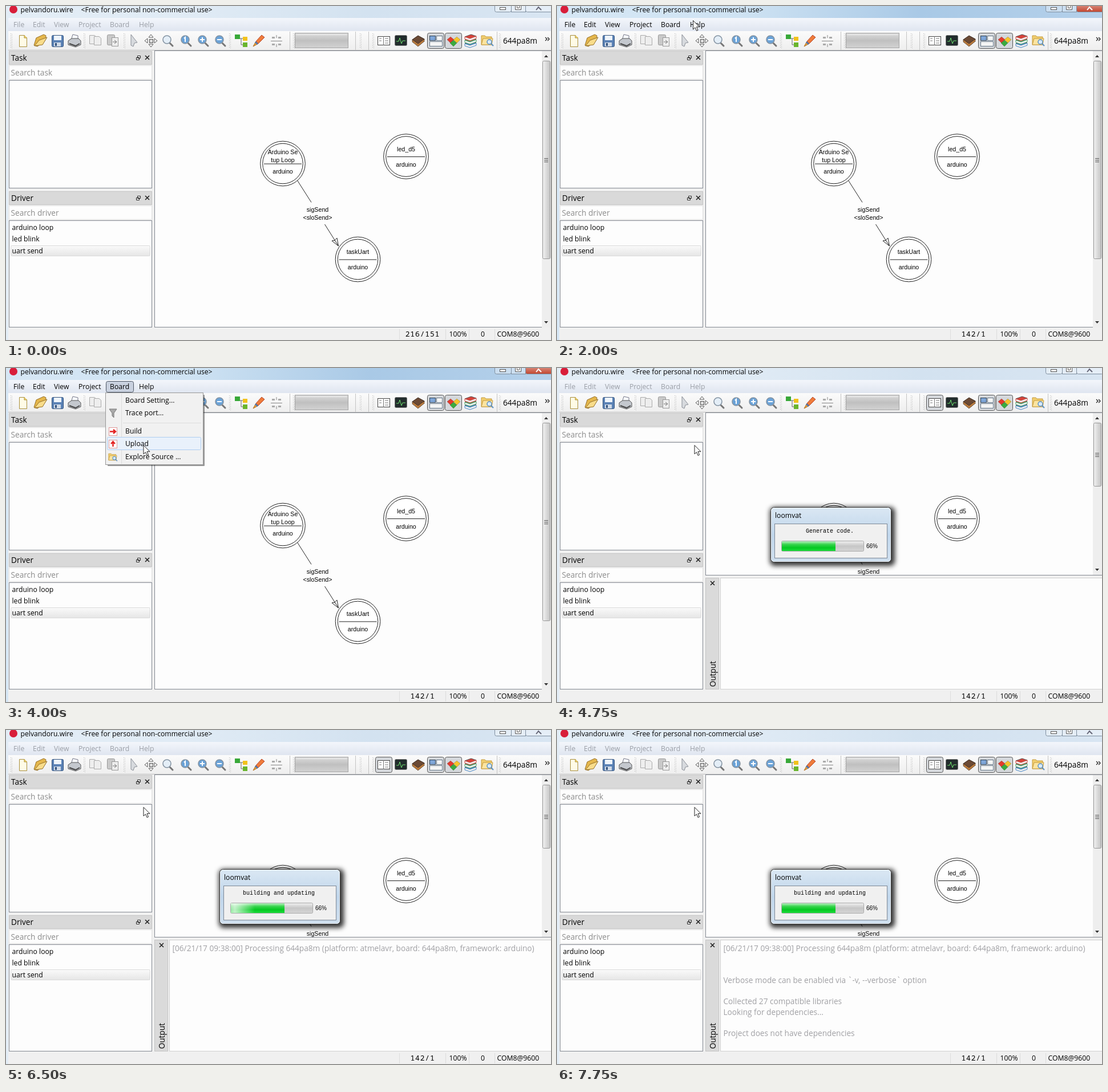
Write an HTML page that moves like this. It is 955x586 px and loops after 8000 ms.

```html
<!DOCTYPE html>
<html lang="en">
<head>
<meta charset="utf-8">
<title>Wire editor</title>
<style>
  html, body { margin: 0; width: 100%; height: 100%; overflow: hidden; background: #f0f0f0; }
  svg { display: block; width: 955px; height: 586px; font: 12.2px "Open Sans", "Noto Sans", sans-serif; }
  text { white-space: pre; }
  .big { font-size: 13.67px; }
  .dim { fill: #8c8c8c; }
  .node { font: 10.65px "Liberation Sans", Arial, sans-serif; text-anchor: middle; }
  .mono { font: 10px "Liberation Mono", monospace; text-anchor: middle; }
  .pos { font: 13px "Noto Sans Mono", monospace; letter-spacing: .85px; text-anchor: middle; }
</style>
</head>
<body>
<svg id="stage" viewBox="0 0 955 586"></svg>
<script>
const STEP = 250, LOOP = 8000;
const stage = document.getElementById('stage');

const rect = (x, y, w, h, fill, more = '') =>
  `<rect x="${x}" y="${y}" width="${w}" height="${h}" fill="${fill}" ${more}/>`;
const box = (x, y, w, h, fill, line, more = '') =>
  rect(x + .5, y + .5, w - 1, h - 1, fill, `stroke="${line}" ${more}`);
const text = (x, y, s, more = '') =>
  `<text x="${x}" y="${y}" ${more}>${s.replace(/</g, '&lt;')}</text>`;
const path = (d, fill = 'none', line = 'none', more = '') =>
  `<path d="${d}" fill="${fill}" stroke="${line}" ${more}/>`;
const disc = (x, y, r, fill, line = 'none', more = '') =>
  `<circle cx="${x}" cy="${y}" r="${r}" fill="${fill}" stroke="${line}" ${more}/>`;
const group = (id, body, more = '') => `<g id="${id}" ${more}>${body}</g>`;
const at = (x, y, body) => `<g transform="translate(${x} ${y})">${body}</g>`;
const grad = (id, down, ...colors) =>
  `<linearGradient id="${id}" x2="${down ? 0 : 1}" y2="${down ? 1 : 0}">` +
  colors.map((c, i) => `<stop offset="${i / (colors.length - 1)}" stop-color="${c}"/>`).join('') +
  '</linearGradient>';

const defs = `<defs>
  ${grad('idleGlass', 0, '#e3edf6', '#e0ebf5', '#d3e2f0', '#d8e5f2')}
  ${grad('liveGlass', 0, '#d6e7f5', '#cfe3f3', '#a9c9e6', '#b4d0ea')}
  ${grad('menuBar', 1, '#f3f6fb', '#dfe5f0')}
  ${grad('bar', 1, '#fbfbfb', '#eeeeee')}
  ${grad('btn', 1, '#dcdcdc', '#c0c0c0', '#d2d2d2')}
  ${grad('row', 1, '#fafafa', '#e6e6e6')}
  ${grad('thumb', 0, '#f3f3f3', '#dadada', '#c4c4c4')}
  ${grad('red', 1, '#e0a295', '#c2452f')}
  ${grad('aero', 1, '#dbe8f4', '#bfd5ea', '#cfdfee')}
  ${grad('track', 1, '#f0f0f0', '#c6c6c6', '#d6d6d6')}
  ${grad('green', 1, '#b5f0bd', '#35d34b', '#05c822', '#1bdc3a')}
  ${grad('shine', 0, '#fff0', '#fffb', '#fff0')}
  <filter id="blur" x="-20%" y="-30%" width="140%" height="160%"><feGaussianBlur stdDeviation="4.5"/></filter>
  <clipPath id="filled"><rect x="394" y="304" width="94" height="17"/></clipPath>
</defs>`;

const frame = (id, glass, close, glyph) =>
  group(id, rect(0, 0, 955, 586, glass) +
    box(856, -6, 30, 17, '#fff5', '#7f8f9f', 'rx="3"') + box(885, -6, 26, 17, '#fff5', '#7f8f9f') +
    box(910, -6, 48, 17, close, '#7f8f9f', 'rx="3"') +
    rect(865.5, 2.5, 10, 4, '#fff', 'stroke="#555"') +
    path('M892.5 -2V6.5H902.5V-2M895.5 0V3.5H899.5V0', '#fff', '#555') +
    path('M929 7L933 2L938 7M930 -1L937 -1', 'none', glyph, 'stroke-width="2"'));

const lens = (x, inner, fill) =>
  path(`M${x + 4} 65L${x + 9} 70`, 'none', '#777', 'stroke-width="3" stroke-linecap="round"') +
  disc(x - 1, 59, 7, fill, '#8594a3', 'stroke-width="1.6"') + inner;
const blueLens = (x, d) => lens(x, path(d, 'none', '#fff', 'stroke-width="2"'), '#6ba3d8');
const folder = path('M-10 -8H-4L-2 -6H8V8H-10Z', '#f1cf70', '#c59a3c') +
  path('M-10 8L-7 -3H10L8 8Z', '#fbe4a0', '#c59a3c');
const findFolder = (x, y, k) => at(x, y, `<g transform="scale(${k})">` + folder +
  disc(4, 3, 4, '#d7eafc', '#5a8fc0', 'stroke-width="1.5"') +
  path('M7 6L11 10', 'none', '#5a8fc0', 'stroke-width="2"') + '</g>');
const grip = x => path(`M${x + .5} 48V74M${x + 2.5} 49V75`, 'none', '#b5b5b5', 'stroke-dasharray="1 2"');
const rule = x => path(`M${x + .5} 45V77`, 'none', '#c3c3c3');
const pressed = x => box(x, 47, 30, 28, '#d5d8dc', '#555', 'rx="3"');
const rhomb = (x, y, c) => path(`M${x} ${y - 5}L${x + 6} ${y}L${x} ${y + 6}L${x - 6} ${y}Z`, c, '#0003');
const book = (y, c) => path(`M804 ${y}L815 ${y - 4}L824 ${y - 1}L813 ${y + 3}Z`, c, '#555') +
  path(`M804 ${y}V${y + 4}L813 ${y + 7}L824 ${y + 3}V${y - 1}L813 ${y + 3}Z`, '#eee', c);

const icons =
  path('M23.5 51.5H32L36.5 56V71.5H23.5Z', '#fffbe6', '#a98f3d') + path('M32 51V56H37', '#f2d56c', '#a98f3d') +
  path('M49 69L53 56L66 50L70 52L69 60L55 71Z', '#e5b74c', '#95702a') + path('M50 70L58 60L72 55L64 68Z', '#f8dc8a', '#95702a') +
  box(80, 51, 21, 21, '#5b82b5', '#33537e', 'rx="2"') + rect(84, 52, 13, 8, '#eef4fb') + rect(84, 64, 12, 7, '#cfd9e6') + rect(86, 65, 3, 5, '#33537e') +
  path('M114 60L117 50L126 52L126 61Z', '#f7fbff', '#778') + path('M109 61L115 57H127L131 61V68L122 72L109 68Z', '#c4c8ce', '#555') + path('M111 66L122 70L129 66', 'none', '#444', 'stroke-width="2"') +
  [146, 154].map(x => path(`M${x + .5} ${x / 4 + 15}H${x + 9}L${x + 12.5} ${x / 4 + 18}V${x / 4 + 30}H${x + .5}Z`, '#eee', '#aaa')).join('') +
  box(177, 50, 14, 19, '#c9c9c9', '#999', 'rx="2"') + box(185, 55, 12, 16, '#eee', '#999') + path('M187 63H193M190 60L194 63L190 66', 'none', '#777') +
  path('M219 50L230 64L225 65L223 71L219 69Z', '#d7dade', '#8b9098') +
  path('M254 50L258 55H250ZM254 72L258 67H250ZM243 61L248 57V65ZM265 61L260 57V65Z', '#fff', '#555') + box(251, 58, 7, 7, '#ddd', '#555') +
  lens(283, '', '#e4eef7') + blueLens(315, 'M312 57L314 55V63') + blueLens(345, 'M340 59H348M344 55V63') + blueLens(375, 'M370 59H378') +
  path('M407 57H418M412 57V68H417', 'none', '#666') + rect(401, 50, 9, 8, '#38a838') + rect(415, 54, 8, 7, '#f2c21c') + rect(415, 64, 8, 8, '#69b52d') +
  path('M433 71L438 62L442 66Z', '#e8a43a', '#b06a20') + path('M438 62L448 51L453 55L442 66Z', '#ef7c3b', '#b5452a') + path('M437 63L441 67', 'none', '#5577aa', 'stroke-width="3"') +
  path('M464 61.5H484M474 51V56M474 67V72', 'none', '#888') + [[466, 54], [477, 54], [466, 66], [477, 66]].map(([x, y]) => rect(x, y, 5, 3, '#aaa')).join('') +
  group('outBtn', pressed(647)) +
  box(651, 53, 22, 16, '#fff', '#444') + path('M661.5 53V69M664 57H670M664 61H670M664 65H670M654 57H658M654 61H658', 'none', '#777') +
  box(681, 51, 22, 19, '#222c2c', '#777', 'rx="2"') + path('M684 62H688L690 56L693 66L695 61H700', 'none', '#6fe06f') +
  path('M712 59L722 52L733 58L722 66Z', '#6b4a35', '#3b2a20') + path('M712 59V63L722 71L733 62V58L722 66Z', '#b97a3c', '#3b2a20', 'stroke-dasharray="2 1"') +
  pressed(738) + box(742, 52, 11, 9, '#7fa6d8', '#345') + box(754, 52, 11, 9, '#f4f4f4', '#678') + box(742, 62, 23, 9, '#f4f4f4', '#678') +
  pressed(769) + rhomb(779, 59, '#e23b2e') + rhomb(790, 59, '#f5c52c') + rhomb(784, 65, '#3aab3f') +
  book(66, '#4a88c8') + book(60, '#4aa568') + book(54, '#d8433a') + findFolder(843, 60, 1);

const dock = (y, name, hint, listH) =>
  box(5, y, 251, 24, '#d9d9d9', '#c4c4c4') + text(9, y + 17, name, 'class="big"') +
  path(`M230.5 ${y + 8.5}H235.5V${y + 12.5}H230.5ZM228.5 ${y + 11.5}H233.5V${y + 15.5}H228.5Z`, '#eee', '#222') +
  path(`M244 ${y + 8}L251 ${y + 15}M251 ${y + 8}L244 ${y + 15}`, 'none', '#222', 'stroke-width="1.6"') +
  box(5, y + 25, 251, 25, '#fdfdfd', '#e2e2e2') + text(8.5, y + 43, hint, 'class="big dim"') +
  box(5, y + 51, 251, listH, '#fdfdfd', '#828790');

const node = (x, y, lines, below) =>
  at(x, y, disc(0, 0, 39.3, '#fff', '#222') + disc(0, 0, 35.3, '#fff', '#222') +
    path('M-33 .5H33', 'none', '#222', 'stroke-width="1.2"') +
    lines.map((s, i) => text(0, -9.5 + 14 * (i + 1 - lines.length) + (lines.length - 1) * 6.5, s)).join('') + text(0, 17.5, below));

const scroll = (h, bottom) =>
  rect(939, 79, 16, bottom - 79, '#eeeeee') +
  path(`M943 90L946.5 86L950 90ZM943 ${bottom - 11}L946.5 ${bottom - 7}L950 ${bottom - 11}Z`, '#333') +
  box(940, 96, 14, h, 'url(#thumb)', '#979797', 'rx="2"') +
  [-3, 0, 3].map(d => rect(943, Math.round(96 + h / 2 + d), 7, 1, '#555')).join('');

const menuNames = [[13, 'File'], [47, 'Edit'], [84, 'View'], [127, 'Project'], [182, 'Board'], [233, 'Help']];
const rows = [[57, 'Board Setting...'], [79, 'Trace port...'], [111, 'Build'], [133, 'Upload'], [156, 'Explore Source ...']];
const redBox = (y, d) => box(180, y - 7, 15, 15, '#fff', '#d99') + path(d, 'none', '#e32222', 'stroke-width="2.4"');

const dropMenu =
  rect(178, 47, 170, 125, '#0006', 'rx="1"') + box(174, 43, 172, 127, '#f1f1f1', '#979797') +
  path('M202.5 45V168M205 96.5H342', 'none', '#dcdcdc') +
  box(177, 0, 165, 23, '#e9f1fb', '#aecdf0', 'id="hover" rx="2"') +
  path('M181 72H194L189 79V87L186 84V79Z', '#aaa', '#777') +
  redBox(111, 'M182 111.5H191M188 108L192 111.5L188 115') + redBox(133, 'M187.5 138V130M184 133L187.5 129L191 133') +
  findFolder(187, 156, .72) + rows.map(([y, s]) => text(209, y + 4, s)).join('');

// Baseline, first step and text of each output line.
const log = [[388, 26, '[06/21/17 09:38:00] Processing 644pa8m (platform: atmelavr, board: 644pa8m, framework: arduino)'],
  [444, 28, 'Verbose mode can be enabled via `-v, --verbose` option'],
  [481, 31, 'Collected 27 compatible libraries'], [500, 31, 'Looking for dependencies...'],
  [537, 31, 'Project does not have dependencies']];

const output =
  rect(260, 363, 695, 202, '#f0f0f0') + rect(260, 363, 695, 1, '#828790') + scroll(112, 363) +
  box(260, 368, 24, 196, '#dadada', '#c4c4c4') + box(286, 368, 680, 196, '#fdfdfd', '#d0d0d0') +
  path('M269 374L276 381M276 374L269 381', 'none', '#222', 'stroke-width="1.6"') +
  text(0, 0, 'Output', 'class="big" transform="translate(278 559.5) rotate(-90)"') +
  log.map(([y, , s], i) => text(291.5, y, s, `id="log${i}" class="big" fill="#a0a0a4"`)).join('') +
  rect(373, 244, 219, 103, '#000c', 'rx="8" filter="url(#blur)"') +
  box(374, 244, 212, 97, 'url(#aero)', '#333', 'rx="6"') + box(375, 245, 210, 95, 'none', '#fffb', 'rx="5"') +
  text(382, 263, 'loomvat') + box(381, 273, 198, 61, '#f0f0f0', '#7d8896') +
  text(478, 288.5, '', 'id="message" class="mono"') +
  box(393, 303, 145, 19, 'url(#track)', '#a9a9a9', 'rx="2"') + rect(394, 304, 94, 17, 'url(#green)') +
  `<g clip-path="url(#filled)">${rect(0, 304, 70, 17, 'url(#shine)', 'id="gleam"')}</g>` +
  text(542, 316, '66%', 'style="font:10px Liberation Sans,Arial,sans-serif"');

stage.innerHTML = defs + frame('idle', 'url(#idleGlass)', '#fff5', '#667') + frame('live', 'url(#liveGlass)', 'url(#red)', '#fff') +
  disc(13, 6, 7, '#d81e3a') + text(25.5, 11, 'pelvandoru.wire') + text(131.5, 11, '<Free for personal non-commercial use>') +
  rect(4, 21, 951, 565, '#f0f0f0') + rect(4, 21, 951, 23, 'url(#menuBar)') +
  group('boardBtn', box(175, 23, 49, 20, '#c9d1df', '#4c5563', 'rx="3"')) +
  group('menuText', menuNames.map(([x, s]) => text(x, 36.5, s)).join('')) +
  rect(4, 44, 951, 34, 'url(#bar)') + rect(4, 77, 951, 1, '#bdbdbd') +
  [8, 136, 206, 391, 503, 620, 642, 864].map(grip).join('') + [497, 612, 635, 860].map(rule).join('') +
  box(506, 47, 94, 27, 'url(#btn)', '#a5a5a5') + rect(509, 50, 88, 1, '#eee') + icons +
  text(871, 66, '644pa8m', 'class="big"') + path('M945 55L948 58L945 61M949 55L952 58L949 61', 'none', '#222', 'stroke-width="1.3"') +
  dock(79, 'Task', 'Search task', 190) + dock(325, 'Driver', 'Search driver', 188) +
  box(8, 420, 245, 19, 'url(#row)', '#dadada', 'rx="2"') +
  ['arduino loop', 'led blink', 'uart send'].map((s, i) => text(10.5, 392.5 + 20.6 * i, s)).join('') +
  box(260, 78, 700, 486, '#fdfdfd', '#828790') + scroll(348, 564) +
  group('graph', path('M510.5 306L535 344.5M558.5 383L582.5 421M571 412L582.5 421L580 407L576 411Z', 'none', '#222') +
    node(485, 276.5, ['Arduino Se', 'tup Loop'], 'arduino') + node(701, 264, ['led_d5'], 'arduino') + node(616.5, 444.5, ['taskUart'], 'arduino') +
    text(546, 361, 'sigSend') + text(546, 375, '<sloSend>'), 'class="node"') +
  [689, 770, 811, 856].map(x => rect(x, 567, 1, 18, '#dcdcdc')).join('') +
  text(730, 580, '', 'id="pos" class="pos"') + text(776.5, 580, '100%') + text(832, 580, '0') + text(860.5, 580, 'COM8@9600') +
  group('output', output) + group('dropMenu', dropMenu) +
  group('cursor', path('M.5 .5V16L4 12.7L6.6 18.5L9 17.4L6.5 11.7H11.5Z', '#fff', '#222'));

const $ = id => document.getElementById(id);
const show = (id, on) => $(id).style.display = on ? '' : 'none';

// Pointer position for each quarter second, starting at the first move.
const trail = [[822, 90], [667, 88], [403, 80], [335, 44], [275, 20], [275, 20], [262, 22], [238, 25], [214, 27],
  [200, 27], [200, 27], [204, 34], [212, 53], [223, 82], [235, 111], [240.5, 135]];

function draw(now) {
  const step = Math.floor(now % LOOP / STEP);
  const [x, y] = trail[Math.min(Math.max(step - 1, 0), trail.length - 1)];
  const live = step >= 6 && step < 19, open = step >= 11 && step < 19, building = step >= 19;

  show('live', live);
  show('idle', !live);
  $('menuText').setAttribute('fill', live ? '#000' : '#9a9ea6');
  show('boardBtn', open);
  show('dropMenu', open);
  show('output', building);
  show('outBtn', building);

  show('cursor', step > 0);
  $('cursor').setAttribute('transform', `translate(${x} ${y})`);
  $('pos').textContent = step < 1 ? '216/151' : step < 3 ? `${x - 261}/${y - 79}` : '142/1';

  const row = rows.find(r => Math.abs(r[0] - y) <= 11);
  show('hover', row);
  if (row) $('hover').setAttribute('y', row[0] - 11.5);

  $('message').textContent = step < 21 ? 'Generate code.' : 'building and updating';
  log.forEach(([, from], i) => show('log' + i, step >= from));
  const sweep = step < 26 ? step - 20 : step - 26;
  show('gleam', sweep >= 0 && sweep < 4);
  $('gleam').setAttribute('x', 366 + 32 * sweep);
}

const start = performance.now();
(function tick() {
  draw(performance.now() - start);
  requestAnimationFrame(tick);
})();
</script>
</body>
</html>
```
